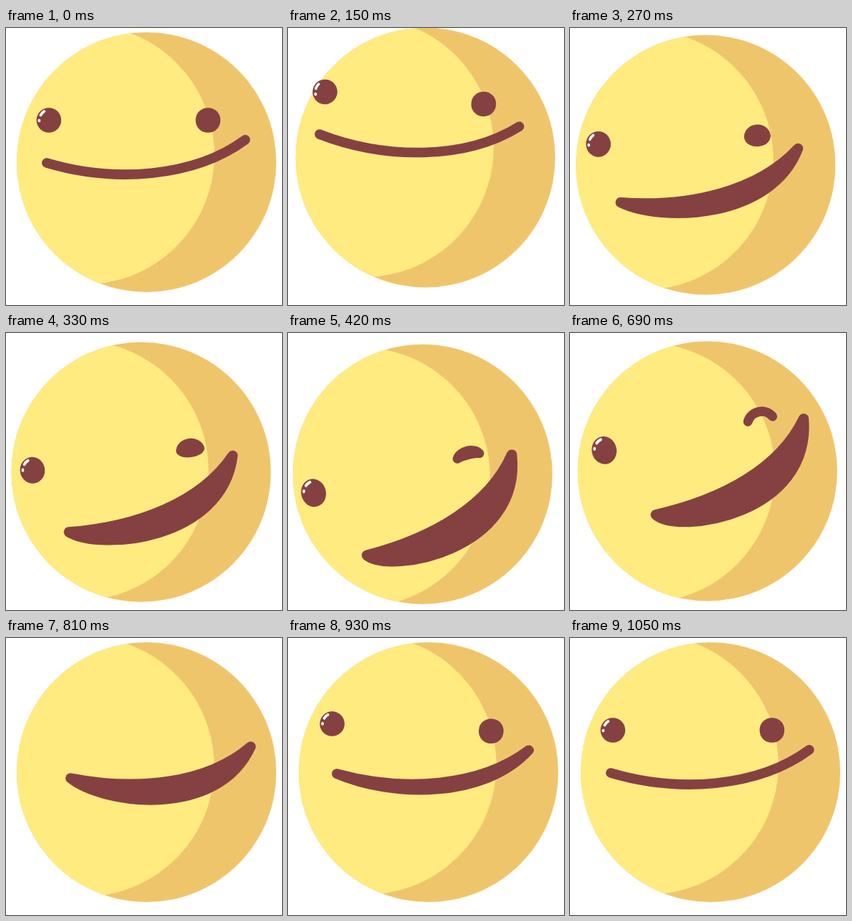
An HTML page that plays this animation: 385 by 386 pixels, repeating every 1440 ms.

```html
<!DOCTYPE html>
<html lang="en">
<head>
<meta charset="utf-8">
<title>Winking ball</title>
<style>
  html, body { margin: 0; width: 100%; height: 100%; overflow: hidden; background: #fff; }
  svg { display: block; width: 100%; height: 100%; }
  .ink { fill: #854142; stroke: #854142; stroke-linecap: round; stroke-linejoin: round; }
  #shine { fill: none; stroke: #fff; stroke-width: 3.7; stroke-linecap: round; }
</style>
</head>
<body>
<svg viewBox="0 0 385 386">
  <clipPath id="disc"><circle r="181"/></clipPath>
  <g id="ball">
    <circle r="181" fill="#efc56c"/>
    <g clip-path="url(#disc)">
      <g id="light"><circle cx="-87" r="181" fill="#ffeb80"/></g>
    </g>
    <g id="face">
      <path id="mouth" class="ink"/>
      <g id="leftEye">
        <circle r="17.3" fill="#854142"/>
        <path id="shine" d="M-11.5 -7Q-9.5 -10.5 -6.5 -12.3M-13.5 0V1"/>
      </g>
      <path id="rightEye" class="ink" stroke-width="13"/>
    </g>
  </g>
</svg>
<script>
const LOOP = 1440, STEP = 30;
const EYE_X = 111;                              // eyes sit at ±EYE_X in face space
const UP = 150, DOWN = 540, RELEASE = 570;      // crouch peak, wink reached, wink let go

// Start, end, then the controls of the upper and lower lip, in face space.
const lineMouth = [[-114, 59.5], [163, 27.3], [-21, 87.3], [91, 80.3], [-21, 87.3], [91, 80.3]];
const openMouth = [[-53, 107], [171, 12], [45, 102], [128, 73], [-35, 141], [160, 154]];

const el = id => document.getElementById(id);
const set = (id, name, value) => el(id).setAttribute(name, value);
const mix = (a, b, k) => a + (b - a) * k;

// Smooth step from one time to another; bias below 1 moves early, above 1 late.
function ease(t, from, to, bias = 1) {
  const u = Math.min(1, Math.max(0, (t - from) / (to - from))) ** bias;
  return u * u * (3 - 2 * u);
}

// A value that goes from rest to up, down into the wink, and back to rest.
function swing(t, rest, up, down, bias, end, endBias) {
  if (t < UP) return mix(rest, up, ease(t, 0, UP));
  if (t < RELEASE) return mix(up, down, ease(t, UP, DOWN, bias));
  return mix(down, rest, ease(t, RELEASE, end, endBias));
}

// Closed shape between two ends with an upper and a lower curve.
const lens = ([a, b, up1, up2, low1, low2]) => `M${a}C${up1} ${up2} ${b}C${low2} ${low1} ${a}Z`;

// A round eye that folds into an arch as wink goes from 0 to 1.
function eyeShape(wink, arch) {
  const w = mix(10.8, 17.6, wink), c = mix(10.8, 10, wink), foot = 1.5 * wink;
  const up = mix(-14.4, -arch, wink), low = mix(14.4, -arch, wink);
  return lens([[-w, foot], [w, foot], [-c, up], [c, up], [-c, low], [c, low]]);
}

function draw(t) {
  const rebound = ease(t, 690, 810) - ease(t, 810, 1000);
  const x = swing(t, 196, 191.7, 187.5, 0.5, 810);
  const y = swing(t, 187, 180.5, 198, 0.5, 810);
  const faceX = swing(t, -25.2, -29.5, -45.5, 0.5, 810) + 5.5 * rebound;
  const faceY = swing(t, -58.5, -83, 8, 0.55, 720) - 12.5 * rebound;
  const tilt = swing(t, 0, 4.4, -17.1, 0.8, 890) + 8.6 * rebound;

  set('ball', 'transform', `translate(${x} ${y})`);
  set('light', 'transform', `rotate(${swing(t, 7, 9.5, -5.2, 0.8, 890)})`);
  set('face', 'transform', `translate(${faceX} ${faceY}) rotate(${tilt})`);

  const smile = swing(t, 0, 0, 1, 0.6, 1050, 1.2);
  set('mouth', 'd', lens(lineMouth.map((p, i) => p.map((v, k) => mix(v, openMouth[i][k], smile)))));
  set('mouth', 'stroke-width', 13.6 + smile);

  // Both eyes blink shut once, while the wink turns back into a round eye.
  const open = ease(Math.abs(t - 810), 0, 90);
  const eye = (side, stretch) => `translate(${side * EYE_X} 0) scale(1 ${stretch * open})`;
  for (const id of ['leftEye', 'rightEye']) set(id, 'visibility', open ? 'visible' : 'hidden');

  set('leftEye', 'transform', eye(-1, swing(t, 1, 1, 1.18, 1.1, 890)));
  set('shine', 'transform', `rotate(${swing(t, 0, -16, 30, 0.8, 890)})`);

  const wink = swing(t, 0, 0, 1, 1.1, 840, 4);
  set('rightEye', 'transform', eye(1, 1));
  set('rightEye', 'd', eyeShape(wink, 7 + 6 * ease(t, RELEASE, 720)));
}

const start = performance.now();
function tick() {
  const t = (performance.now() - start) % LOOP;
  draw(Math.floor(t / STEP) * STEP);
  requestAnimationFrame(tick);
}
tick();
</script>
</body>
</html>
```
